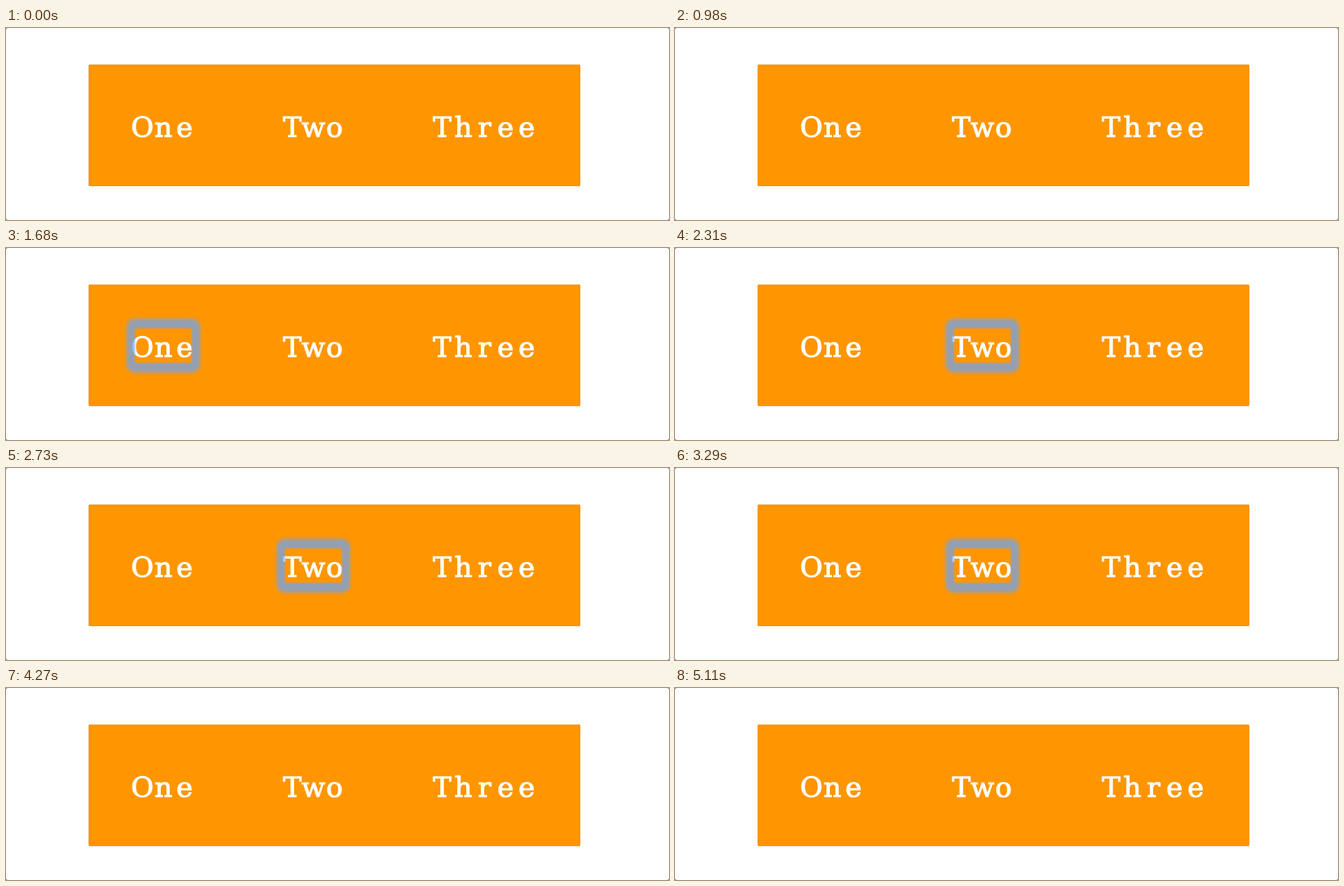
Animation of 980 by 284 pixels, one loop 5.18 s. Source, as an HTML page with a canvas:

```html
<!DOCTYPE html>
<html lang="en">
<head>
<meta charset="utf-8">
<title>Focus order</title>
<style>
  html, body { margin: 0; width: 100%; height: 100%; overflow: hidden; background: #666; }
  .stage { position: relative; width: 980px; height: 284px; background: #fff; border-radius: 3px; overflow: hidden; }
  svg, canvas { position: absolute; left: 0; top: 0; display: block; }
  text {
    font: 400 41px "DejaVu Serif", "Noto Serif", "Liberation Serif", serif;
    text-anchor: middle;
    fill: #fff;
    stroke: #fff;
    stroke-width: 1.2px;
    stroke-linejoin: round;
  }
</style>
</head>
<body>
<div class="stage">
  <svg width="980" height="284">
    <rect x="122.5" y="54.5" width="726" height="179" rx="1" fill="#ff9600" stroke="#f2951a"/>
  </svg>
  <canvas width="980" height="284"></canvas>
</div>
<script>
const LOOP = 5180;
const CELL = 31.2;
const BASELINE = 161.3;
const items = [
  { label: "One", x: 232.7, from: 1120, to: 2310 },
  { label: "Two", x: 454.4, from: 2310, to: 3430 },
  { label: "Three", x: 707.2 }
];

const svg = document.querySelector("svg");
const ctx = document.querySelector("canvas").getContext("2d");

// Centre every letter in its own monospaced cell.
function addLabel({ label, x }) {
  const text = document.createElementNS("http://www.w3.org/2000/svg", "text");
  const first = x - (label.length - 1) * CELL / 2;
  text.setAttribute("x", [...label].map((_, i) => first + i * CELL).join(" "));
  text.setAttribute("y", BASELINE);
  text.textContent = label;
  svg.append(text);
}

function softBox(x, y, w, h, radius, blur) {
  ctx.filter = `blur(${blur}px)`;
  ctx.beginPath();
  ctx.roundRect(x - w / 2, y - h / 2, w, h, radius);
  ctx.fill();
}

// A soft box with a slightly crisper hole cut out of it.
function drawRing(x) {
  ctx.save();
  ctx.fillStyle = "rgba(102, 164, 255, 0.7)";
  softBox(x, 144.5, 109, 80, 13, 2.8);
  ctx.globalCompositeOperation = "destination-out";
  ctx.fillStyle = "#000";
  softBox(x, 144.2, 84, 51, 2, 1.3);
  ctx.restore();
}

let shown;

function render(now) {
  const t = now % LOOP;
  const focused = items.find(item => t >= item.from && t < item.to);
  if (focused !== shown) {
    ctx.clearRect(0, 0, 980, 284);
    if (focused) drawRing(focused.x);
    shown = focused;
  }
  requestAnimationFrame(render);
}

items.forEach(addLabel);
requestAnimationFrame(render);
</script>
</body>
</html>
```
